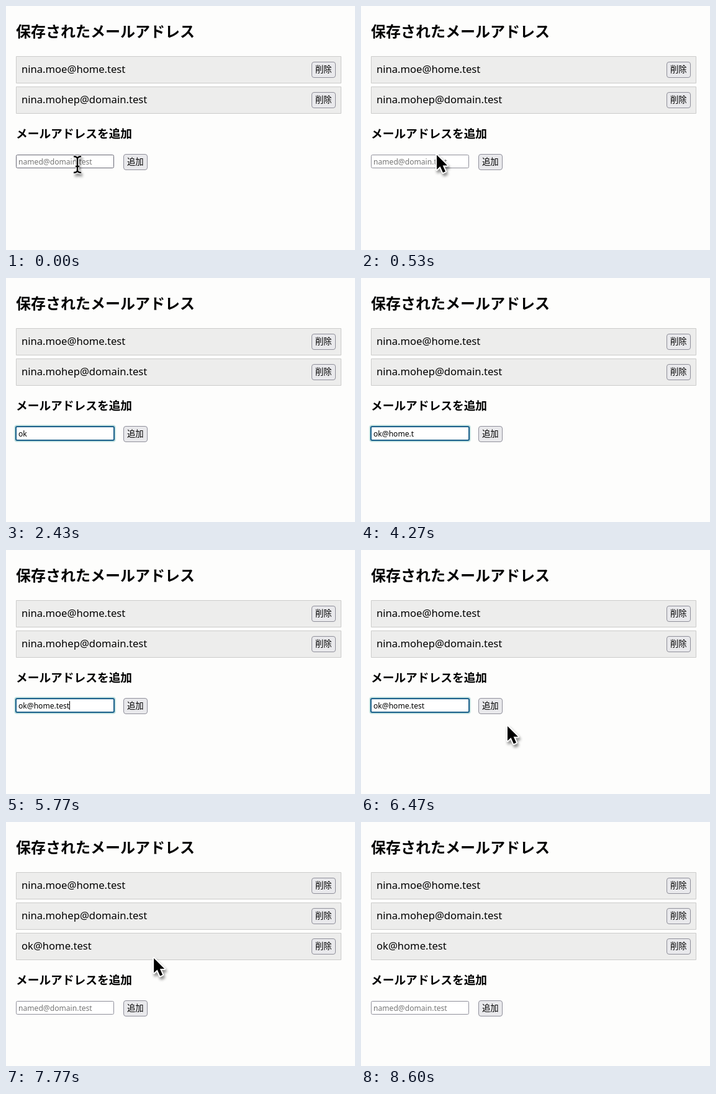
Animation, 562 px wide and 394 px high, one loop 9.13 s. Source, as an HTML page with a canvas:

```html
<!DOCTYPE html>
<html lang="ja">
<head>
<meta charset="utf-8">
<title>メールアドレス</title>
<style>
html, body { margin: 0; width: 100%; height: 100%; overflow: hidden; background: #fdfdfc; }
canvas { display: block; width: 562px; height: 394px; }
</style>
</head>
<body>
<canvas id="stage" width="562" height="394"></canvas>
<script>
const ctx = document.getElementById('stage').getContext('2d');
const LOOP = 9130;
const FOCUS = 970, ADDED = 6900, ROW_STEP = 49;
const LATIN = '"Noto Sans", "Open Sans", sans-serif';
const JAPANESE = '"Noto Sans CJK JP", "Noto Sans CJK", sans-serif';
const PAGE = '#fdfdfc', BORDER = '#8f8f9a';
const saved = ['nina.moe@home.test', 'nina.mohep@domain.test'];
const entry = 'ok@home.test';
const keyTimes = [1430, 1800, 2530, 2830, 3000, 3100, 3300, 3530, 3970, 4400, 4650, 4870];

// Pointer paths as [time, x, y]
const arrival = [[0, 115, 256], [100, 115, 256], [530, 121, 239], [930, 110, 252], [1200, 110, 252]];
const pressing = [[5970, 250, 335], [6470, 235, 283], [6800, 212, 249], [7600, 212, 249]];
const leaving = [[7600, 212, 249], [7770, 237, 219], [8400, 330, -36]];

const between = (t, from, to) => t >= from && t < to;

function pointOn(path, t) {
  const i = path.findIndex((p, n) => n + 1 < path.length && between(t, p[0], path[n + 1][0]));
  if (i < 0) return null;
  const [t0, x0, y0] = path[i], [t1, x1, y1] = path[i + 1];
  const k = (t - t0) / (t1 - t0);
  return { x: x0 + (x1 - x0) * k, y: y0 + (y1 - y0) * k };
}

function box(x, y, w, h, radius, fill, stroke, line = 1) {
  ctx.beginPath();
  ctx.roundRect(x + line / 2, y + line / 2, w - line, h - line, radius);
  ctx.fillStyle = fill;
  ctx.fill();
  ctx.strokeStyle = stroke;
  ctx.lineWidth = line;
  ctx.stroke();
}

function text(str, x, y, font, color = '#000') {
  ctx.font = font;
  ctx.fillStyle = color;
  ctx.fillText(str, x, y);
}

function button(label, x, y, state = '') {
  const fill = { hover: '#d0d0d7', active: '#b1b1b9' }[state] || '#e9e9ec';
  box(x, y, 39, 26, 3.5, fill, BORDER);
  text(label, x + 6, y + 17, '13.33px ' + JAPANESE);
}

function row(address, y) {
  box(16, y, 524, 44, 0, '#ededec', '#cccccb');
  text(address, 25, y + 27, '16.6px ' + LATIN);
  button('削除', 492, y + 9);
}

function input(y, value, focused, hovered, caret) {
  if (focused) {
    box(13, y - 3, 164, 28, 4, '#b9dcdc', '#cce6e4');
    box(15, y - 1, 160, 24, 2, '#fff', '#1a5f8a', 2);
  } else {
    box(16, y, 158, 22, 2, '#fff', hovered ? '#676774' : BORDER);
  }
  text(value || 'named@domain.test', 20, y + 16, '12.1px ' + LATIN, value ? '#000' : '#757575');
  if (caret) {
    ctx.fillRect(Math.round(20 + ctx.measureText(value).width), y + 4, 1, 14);
  }
}

function withShadow(draw) {
  ctx.save();
  ctx.shadowColor = 'rgba(0, 0, 0, .45)';
  ctx.shadowBlur = 4;
  ctx.shadowOffsetX = 2;
  ctx.shadowOffsetY = 4;
  draw();
  ctx.restore();
}

function outlined(path, x, y, fill) {
  ctx.save();
  ctx.translate(x, y);
  ctx.lineJoin = 'round';
  ctx.strokeStyle = '#fff';
  ctx.lineWidth = fill ? 4 : 5;
  withShadow(() => ctx.stroke(path));
  if (fill) {
    ctx.fillStyle = '#000';
    ctx.fill(path);
  } else {
    ctx.strokeStyle = '#000';
    ctx.lineWidth = 2.4;
    ctx.stroke(path);
  }
  ctx.restore();
}

const arrowShape = new Path2D('M1 1.5V25L6.5 20L11 30L15 28.2L10.7 18.5H18Z');
const beamShape = new Path2D('M-6 -13Q0 -13 0 -9Q0 -13 6 -13M0 -9V9M-6 13Q0 13 0 9Q0 13 6 13M-3 3H3');

function draw(t) {
  const added = t >= ADDED;
  const shift = added ? ROW_STEP : 0;
  const focused = between(t, FOCUS, ADDED);
  const typed = added ? '' : entry.slice(0, keyTimes.filter(k => k <= t).length);
  const caret = between(t, 4870, 5250) || between(t, 5770, 6300);
  const pointer = pointOn(arrival, t) || pointOn(pressing, t) || pointOn(leaving, t);
  const inside = (x, y, w, h) => pointer &&
    between(pointer.x, x, x + w) && between(pointer.y, y, y + h);
  const overInput = inside(16, 240 + shift, 158, 22);
  const overAdd = inside(189, 239 + shift, 39, 26);

  ctx.fillStyle = PAGE;
  ctx.fillRect(0, 0, 562, 394);
  text('保存されたメールアドレス', 16, 49.5, 'bold 24px ' + JAPANESE);
  [...saved, ...(added ? [entry] : [])].forEach((address, i) => row(address, 81 + i * ROW_STEP));
  text('メールアドレスを追加', 16, 212.5 + shift, 'bold 18.72px ' + JAPANESE);
  input(240 + shift, typed, focused, overInput, caret);
  button('追加', 189, 239 + shift, overAdd ? (t > 6800 ? 'active' : 'hover') : '');

  if (!pointer) return;
  if (overInput) outlined(beamShape, pointer.x, pointer.y, false);
  else outlined(arrowShape, pointer.x, pointer.y, true);
}

function tick(now) {
  draw(now % LOOP);
  requestAnimationFrame(tick);
}
requestAnimationFrame(tick);
</script>
</body>
</html>
```
